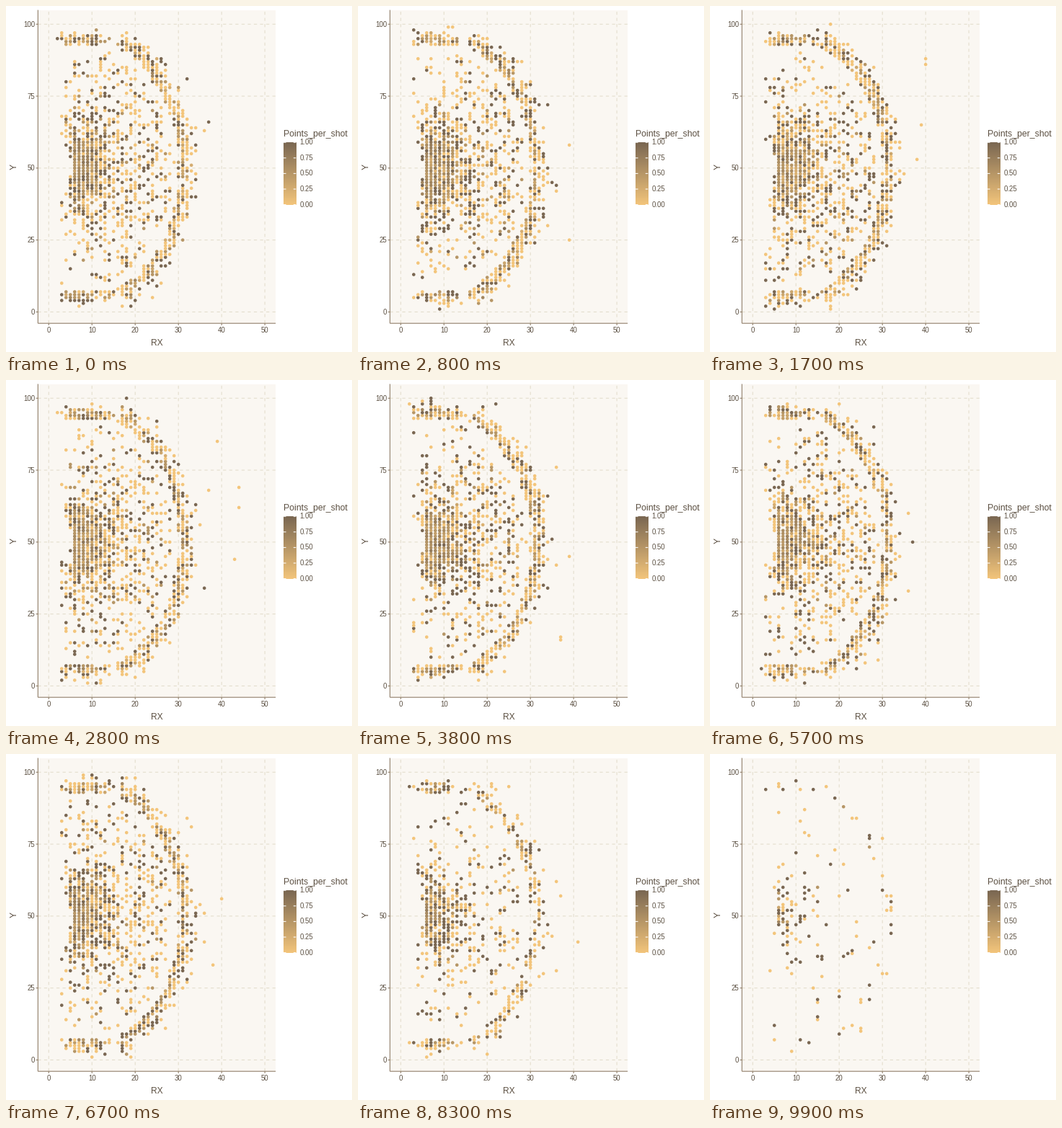
Write a matplotlib script that moves like this. It is 480 by 480 pixels and loops after 10 s.

```python
import numpy as np
import matplotlib.pyplot as plt
from matplotlib.animation import FuncAnimation
from matplotlib.colors import LinearSegmentedColormap

plt.rcParams.update({"font.family": "Liberation Sans", "savefig.dpi": "figure"})

SIZE, DPI = 480, 80
PT = 72 / DPI  # points per pixel
FRAMES, STEP = 100, 100
LEFT, RIGHT, TOP, BOTTOM = 44.3, 374.1, 5.5, 440.2
PANEL, GRID, LINE, INK = "#FAF7F2", "#E3DDCC", "#8D7A64", "#5B4F41"
DUST = LinearSegmentedColormap.from_list("dust", ["#F3C57B", "#7A6752"])

# Court: x covers half of 94 ft, y the full 50 ft width
FT_X, FT_Y = 0.94, 0.5
HOOP_X, HOOP_Y = 5.6, 50


def px(x):
    return LEFT + (np.asarray(x) + 2.5) / 55 * (RIGHT - LEFT)


def py(y):
    return BOTTOM - (np.asarray(y) + 3.95) / 108.9 * (BOTTOM - TOP)


def polar(r, deg):
    a = np.radians(deg)
    return np.column_stack([HOOP_X + r * np.cos(a) / FT_X, HOOP_Y + r * np.sin(a) / FT_Y])


def rim_shots(rng, n):
    return polar(np.abs(rng.normal(0, 4.3, n)), rng.uniform(-95, 95, n))


def mid_shots(rng, n):
    p = polar(rng.uniform(4, 21.6, n), rng.normal(0, 62, n))
    keep = (p[:, 0] > 3) & (np.abs(p[:, 1] - HOOP_Y) < 40)
    return p[keep]


def arc_threes(rng, n):
    return polar(23.1 + rng.gamma(2.3, 0.65, n), rng.uniform(-66, 66, n))


def corner_threes(rng, n):
    side = rng.choice([-1, 1], n)
    depth = 21.2 + rng.gamma(3.2, 0.35, n)
    return np.column_stack([rng.triangular(2, 7, 16, n), HOOP_Y + side * depth / FT_Y])


def heaves(rng, n):
    return np.column_stack([35 + rng.exponential(5, n) % 15, rng.uniform(15, 90, n)])


# Kind of shot, share of all attempts, chance to score
KINDS = [
    (rim_shots, 0.40, 0.55),
    (mid_shots, 0.36, 0.40),
    (arc_threes, 0.25, 0.35),
    (corner_threes, 0.08, 0.38),
    (heaves, 0.0015, 0.05),
]


def attempts(i):
    """Steady during the season, then fewer games up to a single last one."""
    return np.interp(i, [0, 68, 83, FRAMES - 1], [2050, 1900, 950, 160])


def shot_chart(i):
    """Merge shots on the same spot; return the spots and their success rate."""
    rng = np.random.default_rng(300 + i)
    n = attempts(i)
    groups = [kind(rng, rng.poisson(n * share)) for kind, share, _ in KINDS]
    hits = np.concatenate([rng.random(len(g)) < odds for g, (*_, odds) in zip(groups, KINDS)])
    cells = np.rint(np.vstack(groups)).astype(int)
    cells[:, 1] = np.clip(cells[:, 1], 1, 100)
    spots, idx = np.unique(cells, axis=0, return_inverse=True)
    idx = idx.ravel()
    return spots, np.bincount(idx, hits) / np.bincount(idx)


fig = plt.figure(figsize=(SIZE / DPI, SIZE / DPI), dpi=DPI, facecolor="white")
ax = fig.add_axes([0, 0, 1, 1])
ax.axis("off")


def line(xs, ys, color, z, **kw):
    ax.plot(xs, ys, color=color, lw=1.07 * PT, solid_capstyle="butt", snap=False, zorder=z, **kw)


def label(x, y, s, size, ha="center", **kw):
    ax.text(x, y, s, size=size * PT, color=INK, ha=ha, **{"va": "baseline", **kw})


ax.add_patch(plt.Rectangle((LEFT, TOP), RIGHT - LEFT, BOTTOM - TOP, fc=PANEL, lw=0, zorder=0))
dashes = {"ls": (0, (4, 4)), "dash_capstyle": "butt"}
for v in range(0, 101, 25):
    y = py(v)
    line([LEFT, RIGHT], [y, y], GRID, 1, **dashes)
    line([LEFT - 2.74, LEFT], [y, y], LINE, 4)
    label(40, y + 3.5, str(v), 9.6, "right")
for v in range(0, 51, 10):
    x = px(v)
    line([x, x], [BOTTOM, TOP], GRID, 1, **dashes)
    line([x, x], [BOTTOM, BOTTOM + 2.74], LINE, 4)
    label(x, 453, str(v), 9.6)
line([LEFT, LEFT], [TOP, BOTTOM], LINE, 4)
line([LEFT, RIGHT], [BOTTOM, BOTTOM], LINE, 4)
label(209, 471, "RX", 12)
label(11.8, 223, "Y", 12, rotation=90, va="center")

# Colour bar
BAR_L, BAR_R, BAR_T, BAR_B = 385, 402.3, 189.2, 275.6
label(384.5, 181, "Points_per_shot", 12.25, "left")
ax.imshow(np.linspace(1, 0, 300)[:, None], cmap=DUST, aspect="auto",
          extent=(BAR_L, BAR_R, BAR_B, BAR_T), zorder=2)
for v in np.linspace(0, 1, 5):
    y = BAR_B - v * (BAR_B - BAR_T)
    line([BAR_L, BAR_L + 3.5], [y, y], "white", 3)
    line([BAR_R - 3.5, BAR_R], [y, y], "white", 3)
    label(407.5, y + 3, f"{v:.2f}", 9.6, "left")

dots = ax.scatter([], [], c=[], s=(4.6 * PT) ** 2, cmap=DUST, vmin=0, vmax=1,
                  linewidths=0, zorder=3)
ax.set_xlim(0, SIZE)
ax.set_ylim(SIZE, 0)


def update(i):
    spots, rate = shot_chart(i)
    dots.set_offsets(np.column_stack([px(spots[:, 0]), py(spots[:, 1])]))
    dots.set_array(rate)
    return [dots]


anim = FuncAnimation(fig, update, frames=FRAMES, interval=STEP, repeat=True, repeat_delay=0)
plt.show()
```
